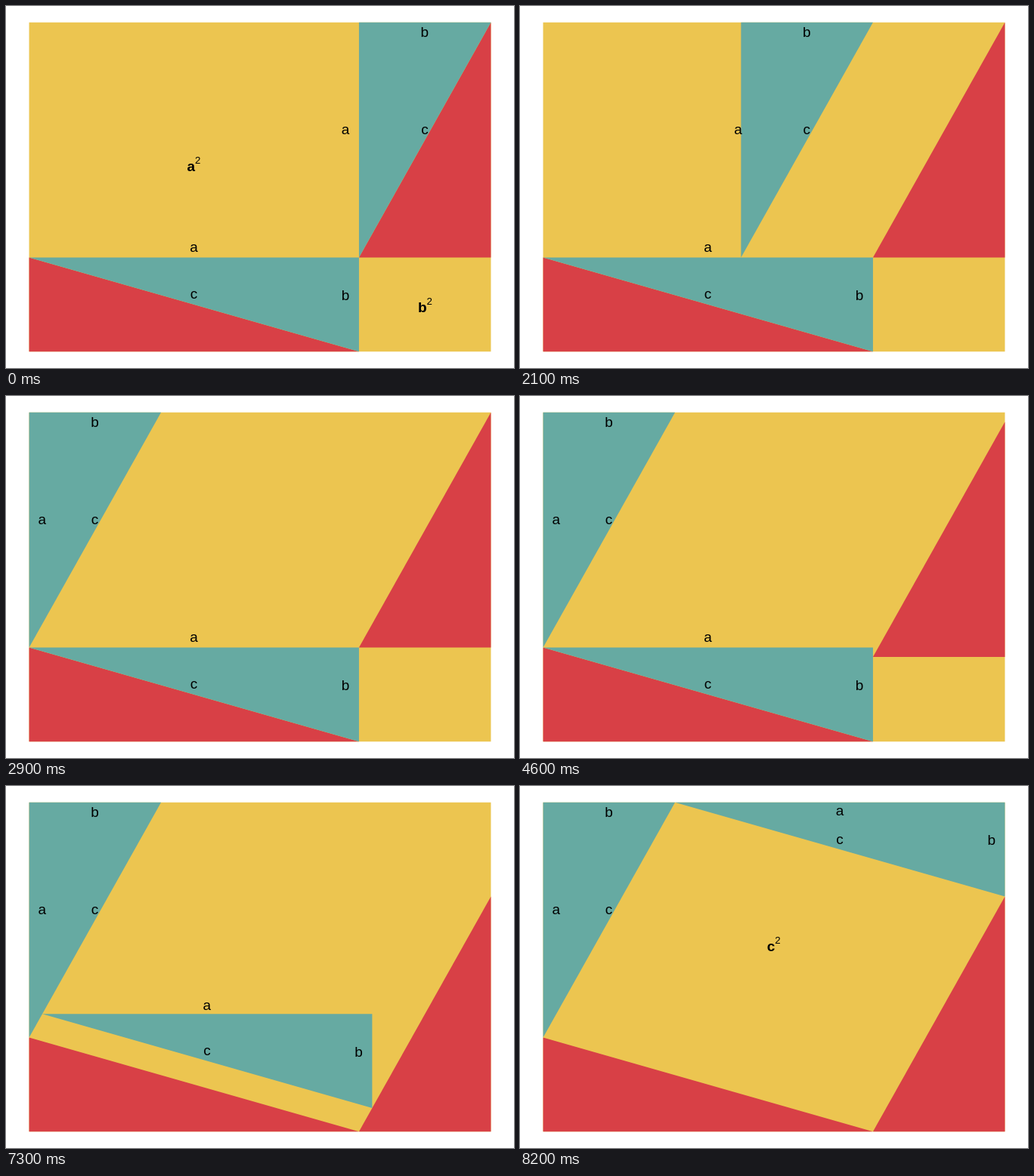
Write an HTML page with a canvas that moves like this. It is 672 by 480 pixels and loops after 10000 ms.

```html
<!DOCTYPE html>
<html lang="en">
<head>
<meta charset="utf-8">
<title>Pythagorean theorem by rearrangement</title>
<style>
  html, body { margin: 0; overflow: hidden; background: #fff; }
  canvas { display: block; }
</style>
</head>
<body>
<canvas id="stage" width="672" height="480"></canvas>
<script>
const ctx = document.getElementById('stage').getContext('2d');
const YELLOW = '#ecc550', TEAL = '#66aaa2', RED = '#d84046';
const FONT = '"Liberation Sans", Arial, sans-serif';
const LOOP = 10000, STEP = 100;
const A = 5, B = 2, SIDE = A + B;

// The square of SIDE units fills the stage inside a 1/22 margin.
const px = x => 672 / 22 * (1 + 20 * x / SIDE);
const py = y => 480 / 22 * (1 + 20 * y / SIDE);

function polygon(color, ...points) {
  ctx.fillStyle = color;
  ctx.beginPath();
  for (const [x, y] of points) ctx.lineTo(px(x), py(y));
  ctx.fill();
}

function write(text, x, y, font) {
  ctx.fillStyle = '#000';
  ctx.font = `${font} ${FONT}`;
  ctx.fillText(text, x, y);
}

function label(text, x, y) {
  ctx.textAlign = 'center';
  write(text, px(x) - 0.3, py(y) + (text === 'b' ? 6.7 : 5.1), '19px');
}

function squared(text, x, y) {
  ctx.textAlign = 'left';
  const left = px(x) - 9.2, base = py(y) + 9.9;
  write(text, left, base, 'bold 19px');
  write('2', left + ctx.measureText(text).width + (text === 'b' ? 7.7 - 7.7 : 0), base - 9.5, '13.3px');
}

// Ten equal steps, the first taken right at the start time.
function progress(t, start) {
  const steps = Math.floor((t - start) / STEP) + 1;
  return Math.min(Math.max(steps, 0), 10) / 10;
}

function draw(t) {
  const left = progress(t, 1800), down = progress(t, 4600), up = progress(t, 7300);
  ctx.clearRect(0, 0, 672, 480);
  polygon(YELLOW, [0, 0], [SIDE, 0], [SIDE, SIDE], [0, SIDE]);

  polygon(RED, [0, A], [A, SIDE], [0, SIDE]);
  const drop = B * down;
  polygon(RED, [SIDE, drop], [SIDE, A + drop], [A, A + drop]);

  const x = A * (1 - left);
  polygon(TEAL, [x, 0], [x + B, 0], [x, A]);

  const u = B * up, v = A * (1 - up);
  polygon(TEAL, [u, v], [u + A, v], [u + A, v + B]);

  label('b', x + 1, 0.2);
  label('c', x + 1, 2.3);
  label('a', 4.8 - 4.6 * left, 2.3);
  label('a', u + 2.5, 4.8 - 4.6 * up);
  label('c', u + 2.5, v + 0.8);
  label('b', u + 4.8, v + 0.8);

  if (left === 0) {
    squared('a', 2.5, 3);
    squared('b', 6, 6);
  }
  if (up === 1) squared('c', 3.5, 3);
}

function frame() {
  draw(performance.now() % LOOP);
  requestAnimationFrame(frame);
}
frame();
</script>
</body>
</html>
```
